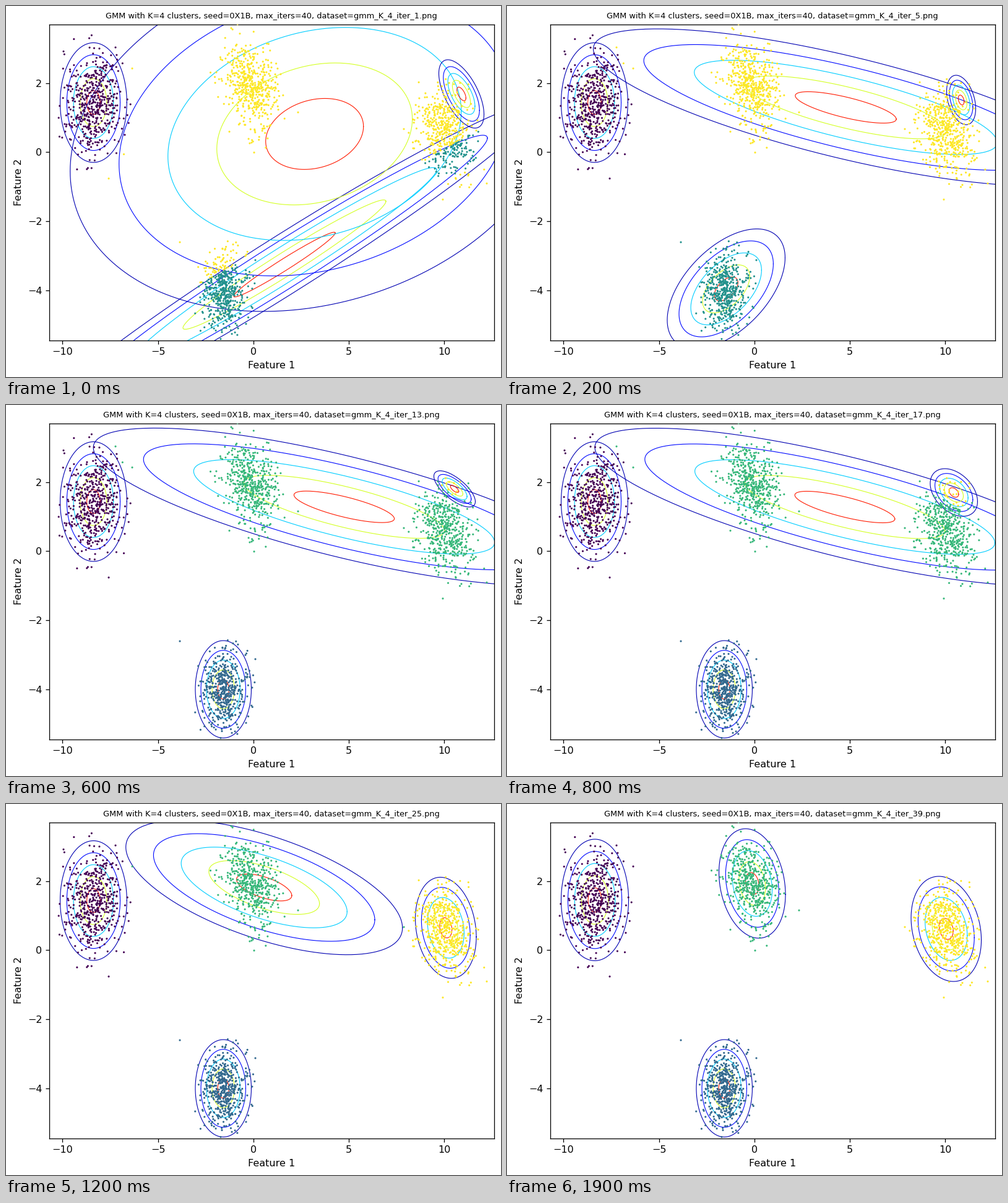
Write a matplotlib script that moves like this. It is 800 px wide and 600 px high and loops after 2000 ms.

```python
import numpy as np
import matplotlib.pyplot as plt
from matplotlib.animation import FuncAnimation

W, H, DPI = 800, 600, 100
LEFT, RIGHT, TOP, BOTTOM = 69.5, 788.5, 29.5, 541.0
X0, Y0, X_UNIT, Y_UNIT = 399.7, 236.4, 30.83, 55.9
FRAMES, STEP = 20, 100
RINGS = np.arange(1, 6)          # each ring is half a standard deviation

# Rows: frame, centre x, centre y, ring width, ring height, correlation
LEFT_BLOB = [[12, 141.4, 156.2, 10.78, 19.35, 0],
             [14, 142, 155.2, 10.9, 19.65, 0]]
LOW_BLOB = [[0, 450, 418.2, 82, 52.3, -.978],
            [2, 354.2, 457.5, 19.05, 19.4, -.52],
            [4, 351.2, 459.8, 9.05, 15.75, 0]]
WIDE_BLOB = [[0, 498.7, 206.9, 79, 57.4, -.21],
             [2, 547.5, 164, 81.6, 25.4, .745],
             [8, 546, 165, 80.8, 25.5, .757],
             [10, 524.4, 162.8, 79.7, 26.9, .79],
             [12, 417.2, 135, 44.7, 21.75, .60],
             [14, 396.3, 128.5, 10.75, 17.7, .20]]
SMALL_BLOB = [[0, 736, 142.2, 7.3, 11.05, .60],
              [2, 734, 152, 4.7, 8, .35],
              [6, 725, 135.7, 6.7, 5.85, .70],
              [8, 722.2, 141.5, 7.65, 7.7, .38],
              [10, 712.5, 171.8, 7.9, 11.25, .03],
              [12, 710.8, 200.2, 9.85, 16.35, .18],
              [14, 709.8, 202, 11.35, 17, .21]]
TRACKS = [np.array(t) for t in (LEFT_BLOB, LOW_BLOB, WIDE_BLOB, SMALL_BLOB)]

STRAYS = [(177, 67), (204, 101), (166, 279), (281, 382), (403, 411),
          (401, 237), (472, 172), (643, 199), (706, 313), (777, 287)]


def shape(u, v, comp):
    """Map unit coordinates onto a component's ring frame."""
    cx, cy, a, b, rho = comp
    return cx + a * u, cy + b * (rho * u + np.sqrt(1 - rho**2) * v)


def state(track, frame):
    return [np.interp(frame, track[:, 0], col) for col in track[:, 1:].T]


def weights(frame):
    small = np.exp(np.interp(frame, [2, 6, 10, 12],
                             np.log([.0007, .003, .045, .24])))
    return .25, .25, .5 - small, small


def log_density(pts, comp, weight):
    cx, cy, a, b, rho = comp
    s = np.sqrt(1 - rho**2)
    u = (pts[0] - cx) / (2 * a)
    v = ((pts[1] - cy) / (2 * b) - rho * u) / s
    return np.log(weight / (a * b * s)) - (u**2 + v**2) / 2


def make_points():
    rng = np.random.default_rng(27)
    groups = []
    for track in TRACKS:
        uv = rng.normal(size=(2, 500))
        uv = uv[:, np.hypot(*uv) < 3.1]
        groups.append(np.array(shape(*(2 * uv), track[-1, 1:])))
    return np.hstack(groups + [np.array(STRAYS, float).T])


def ticks(values, origin, unit):
    return ([origin + unit * v for v in values],
            [str(v).replace("-", "\u2212") for v in values])


plt.rcParams["font.family"] = "DejaVu Sans"
fig = plt.figure(figsize=(W / DPI, H / DPI), dpi=DPI, facecolor="white")
ax = fig.add_axes([LEFT / W, 1 - BOTTOM / H,
                   (RIGHT - LEFT) / W, (BOTTOM - TOP) / H])
ax.set_xlim(LEFT, RIGHT)
ax.set_ylim(BOTTOM, TOP)
ax.set_xticks(*ticks(range(-10, 11, 5), X0, X_UNIT))
ax.set_yticks(*ticks(range(-4, 3, 2), Y0, -Y_UNIT))
ax.tick_params(labelsize=11.5, length=4, width=.92, pad=4)
for spine in ax.spines.values():
    spine.set_linewidth(.92)
ax.set_xlabel("Feature 1", fontsize=11.5, labelpad=4.6)
ax.set_ylabel("Feature 2", fontsize=11.5, labelpad=4.6)
title = ax.set_title("", fontsize=9.25, pad=6.9)

points = make_points()
dots = ax.scatter(*points, c=np.zeros(points.shape[1]), s=5, linewidths=0,
                  cmap="viridis", vmin=0, vmax=1, zorder=3)
ring_colors = plt.get_cmap("jet")(np.exp(-RINGS**2 / 8))
rings = [[ax.plot([], [], color=c, lw=.8, zorder=2)[0] for c in ring_colors]
         for _ in TRACKS]
angle = np.linspace(0, 2 * np.pi, 241)
circle = np.array([np.cos(angle), np.sin(angle)])


def update(frame):
    comps = [state(t, frame) for t in TRACKS]
    scores = [log_density(points, c, w) for c, w in zip(comps, weights(frame))]
    labels = np.argmax(scores, axis=0)
    dots.set_array(labels / labels.max())
    for comp, lines in zip(comps, rings):
        for r, line in zip(RINGS, lines):
            line.set_data(*shape(*(r * circle), comp))
    title.set_text("GMM with K=4 clusters, seed=0X1B, max_iters=40, "
                   f"dataset=gmm_K_4_iter_{2 * frame + 1}.png")
    return [dots, title, *sum(rings, [])]


anim = FuncAnimation(fig, update, frames=FRAMES, interval=STEP, repeat=True)
plt.show()
```
